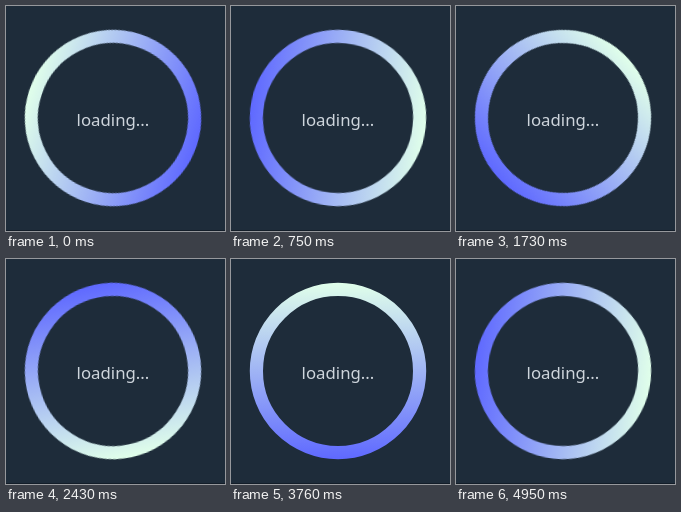
Write an HTML page that moves like this. It is 219 px wide and 225 px high and loops after 5020 ms.

```html
<!DOCTYPE html>
<html lang="en">
<head>
<meta charset="utf-8">
<title>Loading ring</title>
<style>
  html, body { margin: 0; width: 100%; height: 100%; overflow: hidden; background: #1e2c3a; }
  svg { display: block; width: 219px; height: 225px; }
  .ring {
    fill: none;
    stroke: url(#fade);
    stroke-width: 13.2;
    transform-origin: 107px 112px;
    animation: spin 5020ms -1ms infinite;
  }
  text { font: 16.8px "Noto Sans", "Open Sans", sans-serif; fill: #ced5dc; }

  /* 48deg per 70ms tick, with one short 50ms tick near the start */
  @keyframes spin {
    0% { transform: rotate(-72deg); animation-timing-function: steps(4); }
    5.5777% { transform: rotate(120deg); animation-timing-function: steps(1); }
    6.5737% { transform: rotate(168deg); animation-timing-function: steps(67); }
    100% { transform: rotate(3384deg); }
  }
</style>
</head>
<body>
<svg viewBox="0 0 219 225">
  <defs>
    <linearGradient id="fade" gradientUnits="userSpaceOnUse" x1="107" y1="24" x2="107" y2="200">
      <stop offset="0" stop-color="#e0ffea"/>
      <stop offset="1" stop-color="#5f69ff"/>
    </linearGradient>
  </defs>
  <rect width="219" height="225" fill="#1e2c3a"/>
  <rect y="224" width="219" height="1" fill="#131d28"/>
  <circle class="ring" cx="107" cy="112" r="81.6"/>
  <text x="70.6" y="120">loading...</text>
</svg>
</body>
</html>
```
